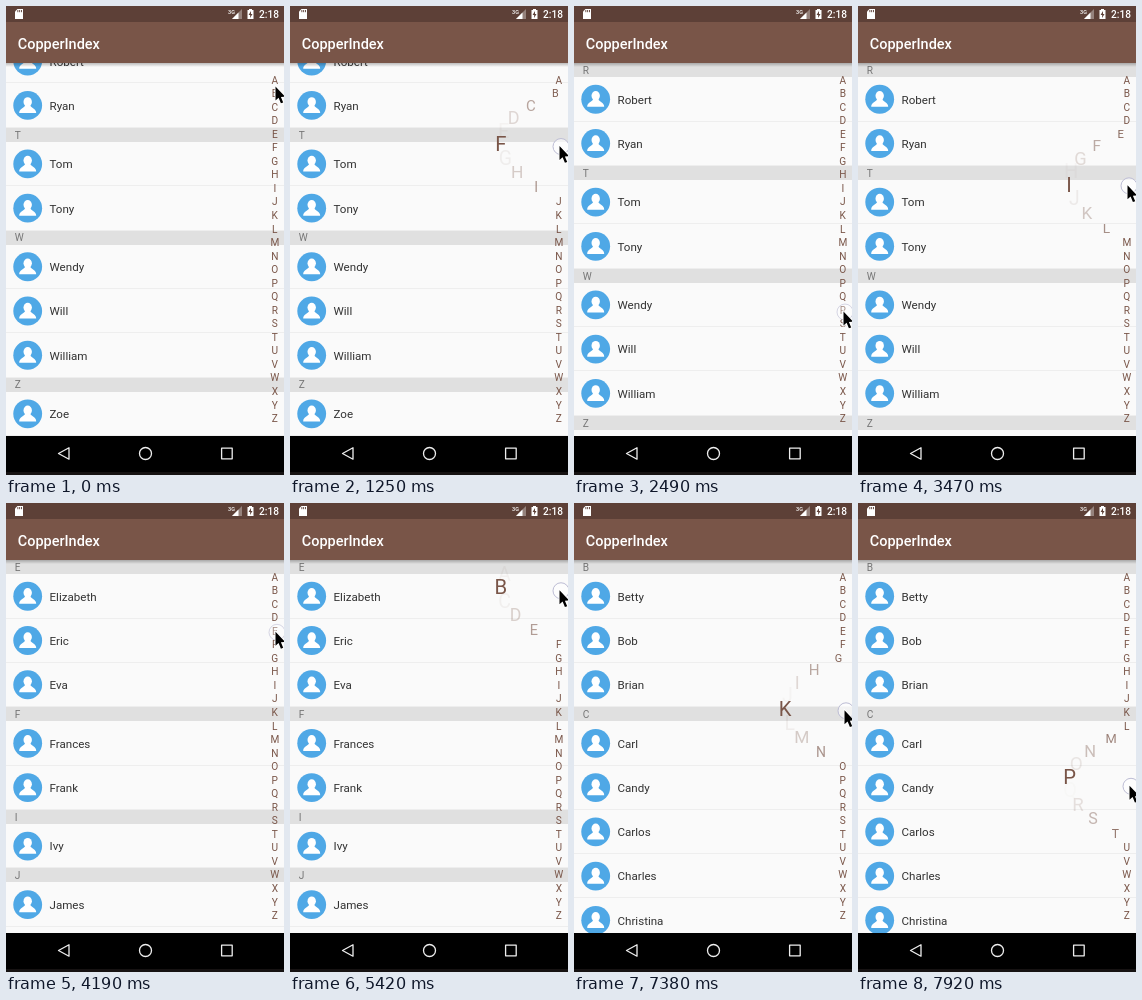
An HTML page with a canvas that plays this animation: 278x469 px, repeating every 8000 ms.

```html
<!DOCTYPE html>
<html lang="en">
<head>
<meta charset="utf-8">
<title>Index bar</title>
<style>
  html, body { margin: 0; width: 100%; height: 100%; overflow: hidden; background: #000; }
  canvas { display: block; }
</style>
</head>
<body>
<canvas id="stage" width="278" height="469"></canvas>
<script>
const ctx = document.getElementById('stage').getContext('2d');
const W = 278, H = 469, LOOP = 8000, TICK = LOOP / 90;
const LIST_TOP = 57, LIST_END = 430, ROW = 44.25, HEAD = 14.3;
const BROWN = '#795548';
const FONT = 'Roboto, sans-serif';
const LETTERS = 'ABCDEFGHIJKLMNOPQRSTUVWXYZ';
const PITCH = 13.54, FIRST_Y = 74, BAR_X = 268.8, BAR_SIZE = 10.14, REACH = 57.9;

const SECTIONS = [
  'Betty Bob Brian', 'Carl Candy Carlos Charles Christina', 'Elizabeth Eric Eva',
  'Frances Frank', 'Ivy', 'James John', 'Robert Ryan', 'Tom Tony', 'Wendy Will William', 'Zoe'
].map(names => names.split(' '));

// Pointer path: [tick, position in letters from A]
const PATH = [
  [0, .48], [2, .48], [3, .62], [5, .48], [6, .48], [7, .4], [11, .4],
  [22, 16.82], [24, 17.3], [25, 17.1], [34, 17.1], [41, 4.05], [52, 4.05],
  [61, .98], [77, .98], [85, 12.8], [87, 9.6], [89, 15.42], [90, 15.42]
];
const PRESSES = [[9, 28], [33, 47], [52, 63], [76, 90]];

function pointerAt(tick) {
  const i = PATH.findIndex(p => p[0] > tick);
  const [t0, a] = PATH[i - 1], [t1, b] = PATH[i];
  return a + (b - a) * (tick - t0) / (t1 - t0);
}

function rect(color, x, y, w, h) {
  ctx.fillStyle = color;
  ctx.fillRect(x, y, w, h);
}

function text(str, x, y, size, color, weight = 400, align = 'left') {
  ctx.font = `${weight} ${size}px ${FONT}`;
  ctx.textAlign = align;
  ctx.fillStyle = color;
  ctx.fillText(str, x, y);
}

function disc(x, y, r, color) {
  ctx.beginPath();
  ctx.arc(x, y, r, 0, 7);
  ctx.fillStyle = color;
  ctx.fill();
}

function polygon(points) {
  ctx.beginPath();
  points.forEach(([x, y]) => ctx.lineTo(x, y));
  ctx.closePath();
}

function drawAvatar(x, y) {
  disc(x, y, 14.4, '#4fa8e6');
  ctx.fillStyle = '#fff';
  ctx.beginPath();
  ctx.ellipse(x, y - 3.4, 4.2, 4.8, 0, 0, 7);
  ctx.fill();
  ctx.beginPath();
  ctx.moveTo(x - 8.5, y + 7.6);
  ctx.bezierCurveTo(x - 8.5, y + 3, x - 4, y + 3, x - 2.5, y);
  ctx.lineTo(x + 2.5, y);
  ctx.bezierCurveTo(x + 4, y + 3, x + 8.5, y + 3, x + 8.5, y + 7.6);
  ctx.fill();
}

function drawList(first, shift) {
  rect('#fafafa', 0, LIST_TOP, W, LIST_END - LIST_TOP);
  let y = LIST_TOP + shift;
  for (const names of SECTIONS.slice(first)) {
    if (y > LIST_END) break;
    rect('#e0e0e0', 0, Math.round(y), W, 14);
    text(names[0][0], 8.7, y + 10.9, BAR_SIZE, '#757575');
    y += HEAD;
    for (const name of names) {
      const mid = y + ROW / 2;
      drawAvatar(21.7, mid - .2);
      text(name, 43.5, mid + 4.2, 11.58, '#333');
      y += ROW;
      rect('#eee', 0, Math.round(y) - 1, W, 1);
    }
  }
}

function drawIndex(pos, pressed) {
  const chosen = pressed ? Math.round(pos) : -1;
  [...LETTERS].forEach((letter, i) => {
    const scale = pressed ? Math.max(0, 1 - (pos - i) ** 2 / 16) : 0;
    ctx.globalAlpha = i === chosen ? 1 : 1 - scale;
    text(letter, BAR_X - REACH * scale, FIRST_Y + PITCH * i + 3.6,
      BAR_SIZE * (1 + scale), BROWN, 400, 'center');
  });
  ctx.globalAlpha = 1;
}

function drawBars() {
  const shade = ctx.createLinearGradient(0, LIST_TOP, 0, LIST_TOP + 4);
  shade.addColorStop(0, 'rgba(0,0,0,.25)');
  shade.addColorStop(1, 'rgba(0,0,0,0)');
  rect(shade, 0, LIST_TOP, W, 4);
  rect(BROWN, 0, 16, W, LIST_TOP - 16);
  rect('#5d4037', 0, 0, W, 16);
  text('CopperIndex', 11.7, 42.6, 14.48, '#fff', 500);

  // Status icons: memory card, signal, battery, clock
  ctx.fillStyle = '#fff';
  polygon([[11.5, 3], [17, 3], [17, 13], [9, 13], [9, 5.5]]);
  ctx.fill();
  for (let i = 0; i < 3; i++) rect('#5d4037', 11.4 + i * 1.8, 4, .9, 2.2);
  text('3G', 222, 7.5, 5.5, '#fff', 500);
  ctx.fillStyle = 'rgba(255,255,255,.35)';
  polygon([[236, 3], [236, 13], [226, 13]]);
  ctx.fill();
  ctx.fillStyle = '#fff';
  polygon([[232.5, 6.5], [232.5, 13], [226, 13]]);
  ctx.fill();
  rect('#fff', 241.5, 4, 6, 9);
  rect('#fff', 243, 3, 3, 1);
  ctx.fillStyle = '#5d4037';
  polygon([[245, 5], [242.6, 9], [244.2, 9], [244, 12], [246.5, 8], [245, 8]]);
  ctx.fill();
  text('2:18', 253, 11.9, BAR_SIZE, '#fff', 500);

  rect('#000', 0, LIST_END, W, H - LIST_END);
  rect('#161212', 0, 466, W, 3);
  ctx.strokeStyle = '#eee';
  ctx.lineWidth = 1.3;
  ctx.lineJoin = 'round';
  polygon([[52.5, 447.5], [63, 441.8], [63, 453.2]]);
  ctx.stroke();
  ctx.beginPath();
  ctx.arc(139.5, 447.5, 6, 0, 7);
  ctx.stroke();
  ctx.strokeRect(215.6, 442.2, 10.6, 10.6);
}

function drawPointer(x, y, touch) {
  if (touch > 0) {
    ctx.globalAlpha = touch;
    disc(x + 2, y + .5, 8, 'rgba(255,255,255,.6)');
    ctx.strokeStyle = '#bcbcd4';
    ctx.lineWidth = 1;
    ctx.stroke();
    ctx.globalAlpha = 1;
  }
  ctx.save();
  ctx.translate(x, y);
  polygon([[.5, 0], [.5, 14], [3.6, 11.2], [5.9, 16.8], [8.2, 15.9], [5.9, 10.4], [10.2, 10.2]]);
  ctx.lineJoin = 'miter';
  ctx.lineWidth = 1.6;
  ctx.strokeStyle = '#fff';
  ctx.stroke();
  ctx.fillStyle = '#000';
  ctx.fill();
  ctx.restore();
}

function draw() {
  const time = performance.now() % LOOP;
  const tick = Math.min(89, Math.floor((time + 3) / TICK));
  const pos = pointerAt(tick);
  const pressed = PRESSES.some(([down, up]) => tick >= down && tick < up);
  const released = Math.max(...PRESSES.map(p => p[1]).filter(up => up <= tick), -9);
  const touch = pressed ? 1 : .6 - (tick - released) * .3;

  if (tick < 28) drawList(6, -38.1);
  else drawList(tick < 47 ? 6 : tick < 63 ? 2 : 0, 0);
  drawBars();
  drawIndex(pos, pressed);
  drawPointer(269 + Math.max(0, tick - 77) / 6, FIRST_Y + PITCH * pos, touch);
  requestAnimationFrame(draw);
}
draw();
</script>
</body>
</html>
```
